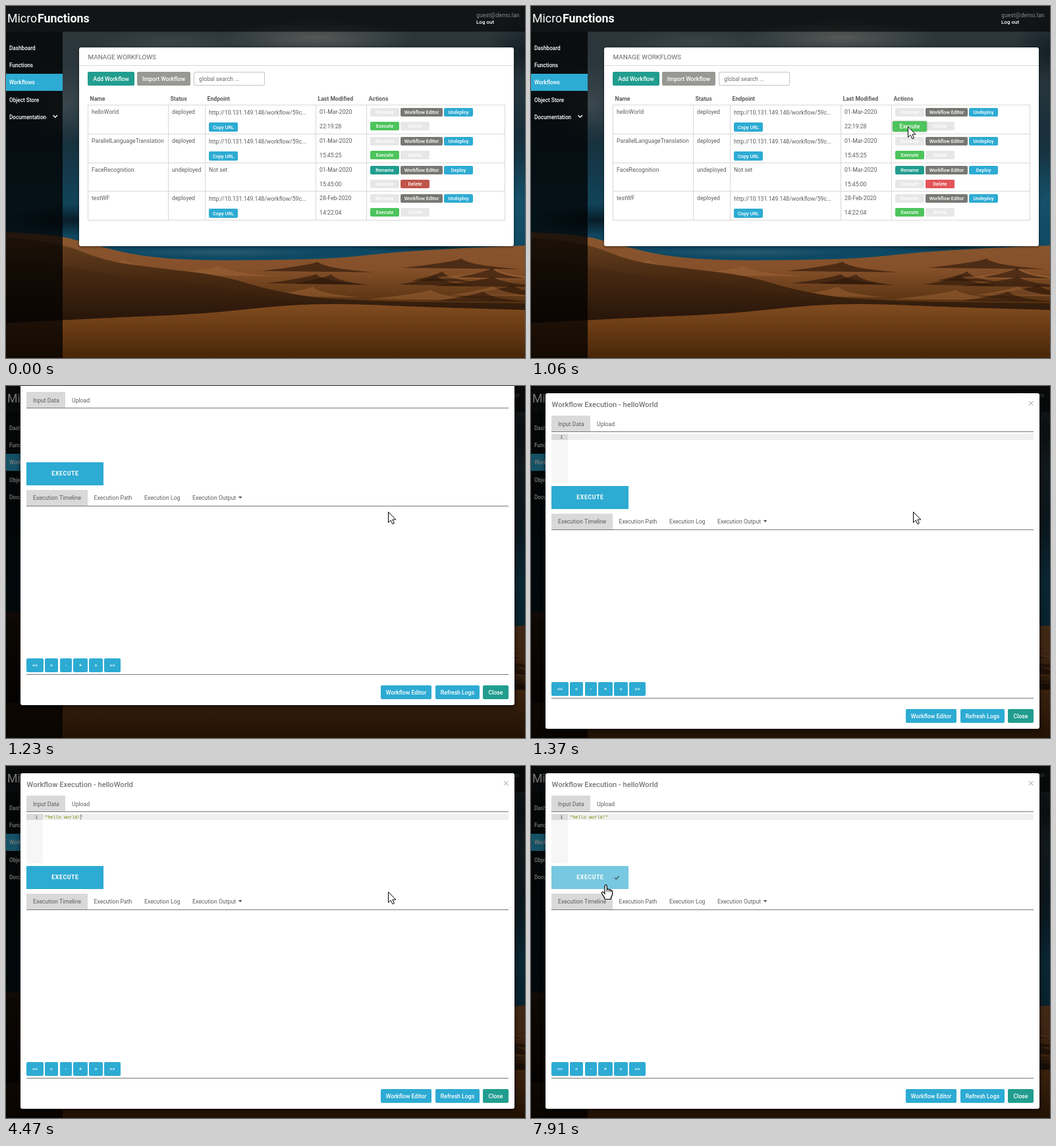
Animation, 788 px wide and 535 px high, one loop 7.99 s. Source, as an HTML page with a canvas:

```html
<!DOCTYPE html>
<html lang="en">
<head>
<meta charset="utf-8">
<title>Workflow manager</title>
<style>
html, body { margin: 0; width: 100%; height: 100%; overflow: hidden; background: #000; }
canvas { display: block; }
</style>
</head>
<body>
<canvas id="stage" width="788" height="535"></canvas>
<script>
const W = 788, H = 535, LOOP = 7990;
const BLUE = '#2dabd3', TEAL = '#219d8f', GREEN = '#4dc45c', GREY = '#777873', OFF = '#e7e7e7';
const INK = '#5d5d5d', LINE = '#d8d8d8', HOVER = '#77c8e0';
let ctx = document.getElementById('stage').getContext('2d');

const clamp = v => Math.max(0, Math.min(1, v));
const easeInOut = v => v * v * (3 - 2 * v);

function box(x, y, w, h, fill, radius = 0) {
  ctx.fillStyle = fill;
  ctx.beginPath();
  ctx.roundRect(x, y, w, h, radius);
  ctx.fill();
}

// y is the middle of the capital letters
function text(str, x, y, { size = 8.7, weight = 400, color = INK, align = 'left', family = 'Roboto, sans-serif', spacing = 0 } = {}) {
  ctx.font = `${weight} ${size}px ${family}`;
  ctx.letterSpacing = spacing + 'px';
  ctx.textAlign = align;
  ctx.fillStyle = color;
  ctx.fillText(str, x, y + size * 0.355);
}

function button(label, x, y, w, h, fill, size = 7.45, color = '#fff') {
  box(x, y, w, h, fill, 2);
  text(label, x + w / 2, y + h / 2, { size, weight: 500, color, align: 'center' });
}

function polygon(points, fill, stroke) {
  ctx.beginPath();
  points.forEach(([x, y]) => ctx.lineTo(x, y));
  ctx.closePath();
  if (fill) { ctx.fillStyle = fill; ctx.fill(); }
  if (stroke) { ctx.strokeStyle = stroke; ctx.stroke(); }
}

function polyline(points, color, width) {
  ctx.beginPath();
  points.forEach(([x, y]) => ctx.lineTo(x, y));
  ctx.strokeStyle = color;
  ctx.lineWidth = width;
  ctx.stroke();
}

function vertical(y0, y1, ...colors) {
  const g = ctx.createLinearGradient(0, y0, 0, y1);
  colors.forEach((c, i) => g.addColorStop(i / (colors.length - 1), c));
  return g;
}

function cloud(x, y, rx, ry, rgb, alpha) {
  ctx.save();
  ctx.translate(x, y);
  ctx.scale(rx, ry);
  const g = ctx.createRadialGradient(0, 0, 0, 0, 0, 1);
  g.addColorStop(0, `rgba(${rgb},${alpha})`);
  g.addColorStop(1, `rgba(${rgb},0)`);
  ctx.fillStyle = g;
  ctx.fillRect(-1, -1, 2, 2);
  ctx.restore();
}

function dune(crest, fill) {
  ctx.beginPath();
  ctx.moveTo(0, H);
  ctx.lineTo(...crest[0]);
  for (let i = 1; i < crest.length - 1; i++) {
    const [x, y] = crest[i], [nx, ny] = crest[i + 1];
    ctx.quadraticCurveTo(x, y, (x + nx) / 2, (y + ny) / 2);
  }
  ctx.lineTo(...crest[crest.length - 1]);
  ctx.lineTo(W, H);
  ctx.fillStyle = fill;
  ctx.fill();
}

function landscape() {
  box(0, 0, W, H, vertical(0, 390, '#2c3437', '#2a373d', '#182f3b', '#124257', '#0d4a66'));
  cloud(470, 48, 150, 26, '120,118,110', 0.55);
  cloud(250, 55, 120, 22, '75,82,84', 0.5);
  cloud(90, 150, 60, 60, '85,92,96', 0.5);
  cloud(790, 70, 60, 50, '12,24,30', 0.8);
  cloud(780, 300, 60, 70, '25,95,125', 0.5);
  cloud(100, 325, 110, 24, '8,24,34', 0.9);
  cloud(330, 374, 150, 8, '70,105,120', 0.5);
  cloud(640, 366, 120, 8, '10,35,48', 0.8);

  dune([[0, 344], [70, 346], [130, 362], [200, 380], [290, 387], [400, 386], [500, 384], [590, 374], [690, 368], [W, 364]],
    vertical(345, 455, '#8a5730', '#85502a', '#54300f'));
  let seed = 11;
  const random = () => (seed = (seed * 16807) % 2147483647) / 2147483647;
  for (let i = 0; i < 26; i++) {
    const x = 150 + random() * 620, y = 392 + random() * 50, w = 40 + random() * 75;
    ctx.beginPath();
    ctx.moveTo(x - w, y + 6);
    ctx.quadraticCurveTo(x - w * 0.2, y - 2, x, y - 8);
    ctx.quadraticCurveTo(x + w * 0.1, y + 2, x + w, y + 8);
    ctx.quadraticCurveTo(x, y + 7, x - w, y + 6);
    ctx.fillStyle = i % 3 ? 'rgba(42,22,9,.62)' : 'rgba(160,101,54,.5)';
    ctx.fill();
  }
  dune([[0, 352], [80, 358], [150, 388], [230, 398], [330, 410], [400, 432], [500, 448], [W, 452]],
    vertical(355, 475, '#67401f', '#472911', '#2a170a'));
  dune([[0, 385], [90, 394], [170, 412], [270, 418], [340, 430], [440, 452], [W, 466]],
    vertical(390, 475, '#4e2d13', '#29160a'));
  dune([[0, 482], [150, 474], [300, 468], [420, 455], [510, 452], [620, 457], [W, 462]],
    vertical(452, H, '#824c20', '#663914', '#482609'));
}

function chrome() {
  box(0, 0, W, 39, 'rgba(0,0,0,.6)');
  box(0, 39, 86, H - 39, 'rgba(0,0,0,.74)');
  text('Micro', 2, 19, { size: 17.8, color: '#fff' });
  text('Functions', 48, 19, { size: 17.8, weight: 700, color: '#fff' });
  text('guest@demo.lan', 714, 14, { color: '#85898a' });
  text('Log out', 714, 24.5, { size: 8, weight: 500, color: '#fff' });
  box(0, 103, 86, 26, BLUE);
  ['Dashboard', 'Functions', 'Workflows', 'Object Store', 'Documentation'].forEach((item, i) =>
    text(item, 5, 64 + i * 26.2, { size: 8.2, weight: 500, color: '#fff' }));
  polyline([[71.5, 166], [74.7, 169.2], [78, 166]], '#fff', 1.4);
}

const rows = [
  ['helloWorld', '01-Mar-2020', '22:19:28', true],
  ['ParallelLanguageTranslation', '01-Mar-2020', '15:45:25', true],
  ['FaceRecognition', '01-Mar-2020', '15:45:00', false],
  ['testWF', '28-Feb-2020', '14:22:04', true]
];

function panel() {
  ctx.save();
  ctx.shadowColor = 'rgba(0,0,0,.5)';
  ctx.shadowBlur = 4;
  ctx.shadowOffsetY = 1;
  box(111, 63, 660, 302, '#fff', 3);
  ctx.restore();
  text('MANAGE WORKFLOWS', 124.5, 77.5, { size: 9.92, color: '#666' });
  box(111, 90, 660, 1, LINE);
  button('Add Workflow', 124, 100, 71, 21, TEAL, 8.7);
  button('Import Workflow', 199, 100, 81, 21, '#989894', 8.7);
  box(285, 100, 108, 21, '#c4c4c4', 3);
  box(286, 101, 106, 19, '#fff', 2);
  text('global search ...', 293, 111, { color: '#6c6c6c' });

  [['Name', 127.5], ['Status', 249.5], ['Endpoint', 305.5], ['Last Modified', 473.5], ['Actions', 550.5]]
    .forEach(([name, x]) => text(name, x, 141, { weight: 700 }));
  const pitch = 43.75;
  for (let i = 0; i < 5; i++) box(124, Math.round(150 + i * pitch), 634, 1, LINE);
  [124, 246, 302, 470, 547, 757].forEach(x => box(x, 150, 1, 176, LINE));

  rows.forEach(([name, date, time, live], i) => {
    const y = Math.round(161 + i * pitch);
    text(name, 130, y);
    text(live ? 'deployed' : 'undeployed', 252, y);
    text(live ? 'http://10.131.149.148/workflow/59c...' : 'Not set', 308, y + (live ? 1 : 0));
    text(date, 476, y);
    text(time, 476, y + 21.5);
    if (live) button('Copy URL', 308, y + 16, 44, 14, BLUE);
    button('Rename', 553, y - 6, 44, 13, live ? OFF : TEAL);
    button('Workflow Editor', 599, y - 6, 64, 13, GREY);
    button(live ? 'Undeploy' : 'Deploy', 665, y - 6, 44, 13, BLUE);
    button('Execute', 553, y + 15, 44, 13, live ? GREEN : OFF);
    button('Delete', 599, y + 15, 44, 13, live ? OFF : '#c0564b');
  });
}

function modalFrame() {
  ctx.save();
  ctx.shadowColor = 'rgba(0,0,0,.6)';
  ctx.shadowBlur = 8;
  ctx.shadowOffsetY = 3;
  box(22, 11, 750, 510, '#fff', 3);
  ctx.restore();
  text('Workflow Execution - helloWorld', 31.5, 28, { size: 11.16, weight: 500, color: '#777' });
  polyline([[756, 23], [762.5, 29.5]], '#999', 1);
  polyline([[762.5, 23], [756, 29.5]], '#999', 1);

  box(31, 45, 59, 24, '#d9d9d9');
  box(31, 69, 732, 1, '#777');
  text('Input Data', 41, 58);
  text('Upload', 100, 58);

  box(31, 194, 93, 24, '#d9d9d9');
  box(31, 218, 732, 1, '#777');
  [['Execution Timeline', 41], ['Execution Path', 133.5], ['Execution Log', 210], ['Execution Output', 283]]
    .forEach(([name, x]) => text(name, x, 206));
  polygon([[353, 204], [358.4, 204], [355.7, 207]], '#444');

  [['<<', 31, 26], ['<', 59, 20], ['-', 82, 18], ['+', 102, 22], ['>', 126, 21], ['>>', 149, 25]]
    .forEach(([label, x, w]) => button(label, x, 450, w, 21, BLUE, 8));
  box(31, 474, 732, 1, '#777');
  button('Workflow Editor', 569, 491, 77, 21, BLUE, 8.7);
  button('Refresh Logs', 652, 491, 67, 21, BLUE, 8.7);
  button('Close', 724, 491, 39, 21, TEAL, 8.7);
}

const phrase = 'hello world!';
const keyTimes = [2460, 2610, 2710, 3070, 3300, 3530, 3700, 3770, 3940, 4090, 4170, 4470];

function editor(t) {
  const mono = { size: 6.9, family: '"Liberation Mono", monospace', color: '#718c00' }, step = 4.15;
  box(31, 72, 25, 76, '#f6f6f6');
  box(31, 73, 25, 9, '#dadada');
  box(56, 73, 707, 9, '#efefef');
  text('1', 48.5, 77.5, { ...mono, color: '#4d4d4c', align: 'right' });
  const typed = keyTimes.filter(k => t >= k).length;
  const open = t >= 2150;
  if (open) text(`"${phrase.slice(0, typed)}"`, 59, 77.5, mono);
  const caretOn = (t >= 1830 && t < 5100) || (t >= 5600 && t < 6110);
  if (caretOn) box(Math.round(59 + (open ? typed + 1 : 0) * step), 73, 1, 9, '#8f908e');
}

function executeButton(t) {
  const tilt = t < 6180 ? 0 : 1 - easeInOut(clamp((t - 6410) / 240));
  const fill = t >= 6110 ? HOVER : BLUE;
  if (tilt > 0) {
    const bottom = 187 - 2 * tilt;
    polygon([[31 - tilt, bottom], [148, bottom], [147.5, 187 + 4 * tilt], [31, 187 + 4 * tilt]], '#68afc5');
    polygon([[31 + tilt * 0.7, 152 + 3 * tilt], [148 - 1.5 * tilt, 152 + 3 * tilt], [148, bottom], [31 - tilt, bottom]], fill);
  } else {
    box(31, 152, 117, 35, fill);
  }
  ctx.save();
  ctx.translate(89.6, 169);
  ctx.scale(1, 1 - 0.1 * tilt);
  text('EXECUTE', 0.3, 0, { weight: 700, color: '#fff', align: 'center', spacing: 0.62 });
  ctx.restore();

  const tick = t < 6800 ? 0 : t < 6870 ? 0.35 : t < 7040 ? 0.7 : 1;
  if (tick) {
    ctx.globalAlpha = tick;
    polyline([[127, 169.8], [129.3, 172], [133.6, 167.7]], '#54707b', 1.8);
    ctx.globalAlpha = 1;
  }
}

function arrow(x, y) {
  ctx.save();
  ctx.translate(x + 0.5, y + 0.5);
  ctx.lineWidth = 1;
  polygon([[0, 0], [0, 16], [3.7, 12.6], [6.4, 18.3], [9, 17.2], [6.4, 11.6], [11.4, 11.6]], '#fff', '#000');
  ctx.restore();
}

function hand(x, y) {
  ctx.save();
  ctx.translate(x, y);
  ctx.beginPath();
  ctx.moveTo(-1.5, 1.5);
  ctx.quadraticCurveTo(0, -1.5, 1.7, 1.5);
  ctx.lineTo(1.9, 7);
  ctx.quadraticCurveTo(4, 5.6, 5, 7.7);
  ctx.quadraticCurveTo(7, 6.5, 7.8, 8.7);
  ctx.quadraticCurveTo(10.2, 8, 10.3, 10.8);
  ctx.quadraticCurveTo(10.4, 16, 8, 19);
  ctx.lineTo(7.8, 22);
  ctx.lineTo(-1.2, 22);
  ctx.quadraticCurveTo(-2, 18.5, -5, 14.8);
  ctx.quadraticCurveTo(-7.2, 11.6, -5.4, 11);
  ctx.quadraticCurveTo(-3.6, 10.6, -1.5, 13.5);
  ctx.closePath();
  ctx.fillStyle = '#fff';
  ctx.fill();
  ctx.strokeStyle = '#000';
  ctx.lineWidth = 1.2;
  ctx.stroke();
  [[1.9, 10.5], [5, 10.8], [7.8, 11.3]].forEach(([px, py]) => polyline([[px, 7.5], [px, py]], '#000', 1));
  ctx.restore();
}

const bezier = (a, b, c, d, u) =>
  a * (1 - u) ** 3 + 3 * b * u * (1 - u) ** 2 + 3 * c * u * u * (1 - u) + d * u ** 3;

// progress in equal screen refreshes between two times
const stepped = (t, from, to, count) =>
  clamp(Math.floor((t - from) / (to - from) * (count - 1) + 1e-6) / (count - 1));

function pointer(t) {
  if (t < 210) return;
  if (t < 5250) {
    const u = 1 - (1 - stepped(t, 210, 820, 9)) ** 2;
    const drift = t < 1140 ? 0 : t < 1230 ? 4 : 8;
    arrow(728 - 156 * u + drift, 464 - 281 * u + drift);
  } else {
    const u = easeInOut((stepped(t, 5250, 6030, 11) * 10 + 1) / 11);
    const x = bezier(580, 400, 20, 112.5, u), y = bezier(191, 296, 322, 179.5, u);
    const clickable = (t >= 6110 && t < 6180) || t >= 7910;
    if (clickable) hand(113.5, 180.5);
    else arrow(x, y);
  }
}

function pageHover(t) {
  if (t >= 440) button('Delete', 599, 264, 44, 13, '#e3555a');
  if (t < 820) return;
  ctx.save();
  ctx.shadowColor = 'rgba(0,0,0,.35)';
  ctx.shadowBlur = 3;
  box(549, 175, 52, 16, GREEN, 2);
  ctx.restore();
  text('Execute', 575, 183, { size: 8.7, weight: 500, color: '#fff', align: 'center' });
}

function cached(paint) {
  const layer = document.createElement('canvas');
  layer.width = W;
  layer.height = H;
  const main = ctx;
  ctx = layer.getContext('2d');
  paint();
  ctx = main;
  return layer;
}

const page = cached(() => { landscape(); chrome(); panel(); });

function draw(t) {
  ctx.drawImage(page, 0, 0);
  if (t < 1230) pageHover(t);
  if (t >= 1140) {
    const opening = t < 1230;
    box(0, 0, W, H, `rgba(0,0,0,${opening ? 0.3 : 0.52})`);
    ctx.save();
    ctx.globalAlpha = opening ? 0.6 : 1;
    ctx.translate(0, opening ? -92 : t < 1290 ? -36 : t < 1370 ? -9 : 0);
    modalFrame();
    if (t >= 1370) editor(t);
    executeButton(t);
    ctx.restore();
  }
  pointer(t);
}

const start = performance.now();
function tick() {
  draw((performance.now() - start) % LOOP);
  requestAnimationFrame(tick);
}
tick();
</script>
</body>
</html>
```
